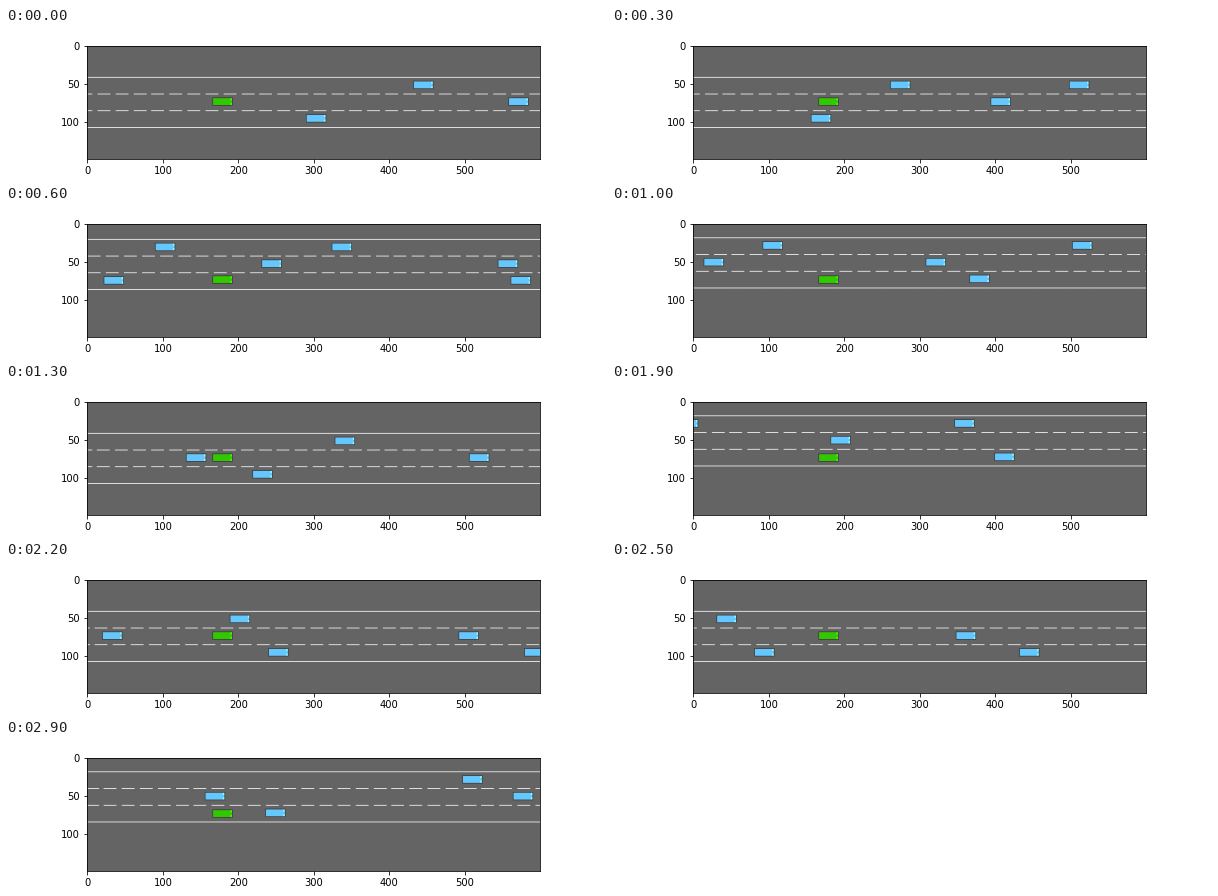
A matplotlib script that plays this animation: 600x150 px, repeating every 3 s.

```python
import numpy as np
import matplotlib.pyplot as plt
from matplotlib.animation import FuncAnimation

DPI, WIDTH, HEIGHT = 72, 600, 150
FRAMES, INTERVAL = 30, 100

ASPHALT = 100
WHITE = 255
OUTLINE = 60
GREEN = (50, 200, 0)
BLUE = (100, 200, 255)

LANE = 22                  # lane width
CAR_W, CAR_H = 27, 11
EGO_X, EGO_Y = 166, 69     # the camera follows the green car
DASH, PERIOD = 17, 23.815  # lane marking length and spacing

# steps at which the green car swaps between the middle and the lower lane
SWAPS = [6, 13, 18, 22, 28]

# per lane: (step at which the green car draws level, closing speed)
TRAFFIC = [
    [(4.67, 57), (8.72, 58), (15.79, 58), (22.43, 52.5), (35.37, 52)],
    [(7.2, 54.4), (12.41, 59), (19.3, 54), (28.79, 48), (36.96, 50)],
    [(2.77, 44.7), (14.08, 48.9), (23.4, 53), (30.43, 49)],
]


def fill(img, x, y, w, h, color):
    img[max(y, 0):max(y + h, 0), max(x, 0):max(x + w, 0)] = color


def draw_car(img, x, y, color):
    fill(img, x, y, CAR_W, CAR_H, OUTLINE)
    fill(img, x + 1, y + 1, CAR_W - 2, CAR_H - 2, color)
    headlight = [min(255, int(c / 0.68)) for c in color]
    for dy in (1, 7):
        fill(img, x + 24, y + dy, 2, 3, headlight)


def road_top(swaps, step):
    """Upper road edge; a swap to the lower lane settles one step later."""
    if len(swaps) % 2 == 0:
        return 42
    return 21 if step == swaps[-1] else 19


def draw_road(img, top, phase):
    for edge in (0, 3):
        fill(img, 0, top + edge * LANE, WIDTH, 1, WHITE)
    for x in np.arange(phase % PERIOD - PERIOD, WIDTH, PERIOD):
        for edge in (1, 2):
            fill(img, int(np.floor(x)), top + edge * LANE, DASH, 1, WHITE)


def scene(step):
    img = np.full((HEIGHT, WIDTH, 3), ASPHALT, np.uint8)
    swaps = [s for s in SWAPS if s <= step]
    top = road_top(swaps, step)

    # each swap costs a little forward travel
    draw_road(img, top, 14.5 + 0.55 * step + 8 * len(swaps))

    for lane, cars in enumerate(TRAFFIC):
        y = top + LANE * lane + (LANE - CAR_H) // 2
        for level, speed in cars:
            draw_car(img, round(EGO_X + speed * (level - step)), y, BLUE)
    draw_car(img, EGO_X, EGO_Y, GREEN)
    return img


fig, ax = plt.subplots(figsize=(WIDTH / DPI, HEIGHT / DPI), dpi=DPI)
fig.subplots_adjust(left=0.125, right=0.9, bottom=0.125, top=0.88)
picture = ax.imshow(scene(0))


def update(step):
    picture.set_data(scene(step))
    return [picture]


anim = FuncAnimation(fig, update, frames=FRAMES, interval=INTERVAL,
                     repeat=True, repeat_delay=0)
plt.show()
```
